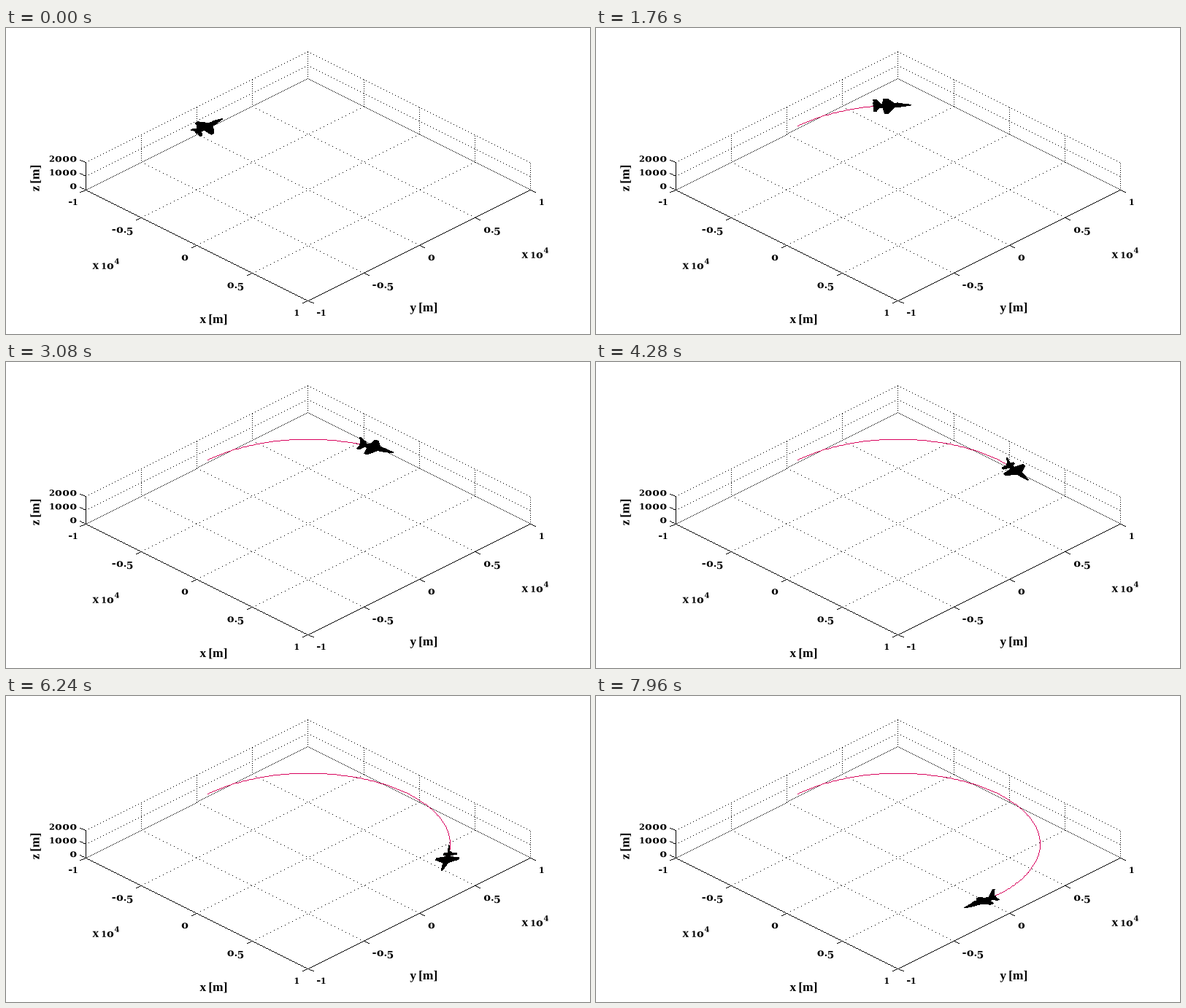
Animation, 800 px wide and 420 px high, one loop 8 s. Source, as a matplotlib script:

```python
import numpy as np
import matplotlib.pyplot as plt
from matplotlib.animation import FuncAnimation
from matplotlib.collections import PolyCollection
from matplotlib.patches import PathPatch
from matplotlib.path import Path
from matplotlib.textpath import TextPath
from matplotlib.transforms import Affine2D

W, H, DPI = 800, 420, 100
FRAMES, INTERVAL = 200, 40

SCALE = 215.3                       # pixels per 10 km
SIN_EL, COS_EL = 0.5, np.sqrt(0.75)
CENTER = np.array([413.4, 221.6])

RADIUS, ALTITUDE = 0.9035, 0.1
START, RATE = np.radians(-135), np.radians(0.95)
BANK = np.radians(9)

fig = plt.figure(figsize=(W / DPI, H / DPI), dpi=DPI, facecolor="white")
ax = fig.add_axes([0, 0, 1, 1])
ax.set_xlim(-0.5, W - 0.5)
ax.set_ylim(H - 0.5, -0.5)
ax.axis("off")


# ---- crisp one-pixel lines ----
def raster(a, b, step=1, phase=0):
    """Pixels of the line a-b, one every `step` along its longer axis."""
    a, b = np.round(a), np.round(b)
    n = max(np.abs(b - a).max(), 1)
    s = np.arange(phase, n + 0.5, step) / n
    return np.round(a + s[:, None] * (b - a))


SQUARE = np.array([(-.5, -.5), (.5, -.5), (.5, .5), (-.5, .5), (-.5, -.5)])
CODES = [Path.MOVETO] + [Path.LINETO] * 3 + [Path.CLOSEPOLY]


def pixel_path(pts):
    verts = (np.asarray(pts)[:, None] + SQUARE).reshape(-1, 2)
    return Path(verts, np.tile(CODES, len(pts)))


# ---- axes box ----
def project(x, y, z=0.0):
    """Scene coordinates (units of 10 km) to pixels."""
    r = SCALE / np.sqrt(2)
    return CENTER + np.array([r * (x + y),
                              r * SIN_EL * (x - y) - SCALE * COS_EL * z])


TICKS = (-1, -0.5, 0, 0.5, 1)
LEVELS = (0, 0.1, 0.2)
lines = []

for t in TICKS[1:-1]:
    lines.append(raster(project(t, -1), project(t, 1), 5))
    lines.append(raster(project(-1, t), project(1, t), 5))
for z in LEVELS:
    lines.append(raster(project(-1, -1, z), project(-1, 1, z), 4))
    lines.append(raster(project(-1, 1, z), project(1, 1, z), 4))
lines.append(raster(project(-1, -1), project(-1, 1), 4, 2))
lines.append(raster(project(-1, 1), project(1, 1), 4, 2))
for t in TICKS:
    if t > -1:
        lines.append(raster(project(-1, t), project(-1, t, 0.2), 3))
    lines.append(raster(project(t, 1), project(t, 1, 0.2), 3))

lines.append(raster(project(-1, -1), project(1, -1)))
lines.append(raster(project(1, -1), project(1, 1)))
lines.append(raster(project(-1, -1), project(-1, -1, 0.2)))
for t in TICKS:
    lines.append(raster(project(t, -1), project(t, -1) + (-7.5, 3.6)))
    lines.append(raster(project(1, t), project(1, t) + (7.5, 3.6)))
for z in LEVELS:
    lines.append(raster(project(-1, -1, z),
                        project(-1, -1, z) + (-7.5, -3.6)))

ax.add_patch(PathPatch(pixel_path(np.concatenate(lines)), fc="black", lw=0,
                       snap=False))


# ---- labels with old-style figures: glyph, size factor, drop in pixels ----
FIGURES = {"0": ("o", 1, 0), "1": ("1", 0.78, 0), "2": ("2", 0.78, 0),
           "5": ("5", 0.95, 3), "4": ("4", 0.7, -7),
           "-": ("-", 1, 0), ".": (".", 0.9, 0)}


def glyph(ch):
    if ch in FIGURES:
        ch, k, drop = FIGURES[ch]
        family, size, gap = "DejaVu Serif", 14.5 * k, 1.7
    else:
        family, size, drop, gap = "Liberation Serif", 17.5, 0, 1
    prop = {"family": family, "weight": "bold"}
    return TextPath((0, 0), ch, size=size, prop=prop), drop, gap


def label(text, x, y, right=False, angle=0):
    parts, pen, gap = [], 0, 0
    for ch in text:
        if ch == " ":
            pen += 3.5
            continue
        path, drop, gap = glyph(ch)
        box = path.get_extents()
        parts.append(path.transformed(
            Affine2D().translate(pen - box.x0, -drop).scale(1, -1)))
        pen += box.width + gap
    shift = gap - pen if right else 0
    place = Affine2D().translate(shift, 0).rotate_deg(angle).translate(x, y)
    path = Path.make_compound_path(*parts).transformed(place)
    ax.add_patch(PathPatch(path, fc="black", lw=0))


NAMES = ("-1", "-0.5", "0", "0.5", "1")
for i, name in enumerate(NAMES):
    label(name, 97 + 75.9 * i, 242.5 + 38 * i, right=True)
    label(name, 425.5 + 76.3 * i, 394.5 - 38 * i)
for i, name in enumerate(("0", "1000", "2000")):
    label(name, 96, 220.5 - 18.7 * i, right=True)
label("x 104", 118, 330.3)
label("x 104", 706, 315.3)
label("x [m]", 265, 404.5)
label("y [m]", 553, 388.5)
label("z [m]", 45, 223.5, angle=-90)


# ---- aircraft: (forward, right, up) in pixels ----
def build_jet():
    parts = []
    f = np.array([28.5, 25, 18, 11, 3, -8, -18, -23])
    w = np.array([0.2, 0.8, 1.8, 2.5, 2.8, 2.8, 2.3, 1.5])
    for a in np.radians([0, 45, 90, 135]):
        parts.append([(p, s * q * np.cos(a), s * q * np.sin(a))
                      for s in (1, -1)
                      for p, q in list(zip(f, w))[::s]])
    for s in (1, -1):
        parts.append([(13, 2 * s, 0), (6, 4 * s, 0), (-3.5, 16 * s, -0.8),
                      (-8.5, 16 * s, -0.8), (-10.5, 2 * s, 0)])
        parts.append([(-14.5, 1.5 * s, 0), (-19.5, 9.3 * s, -1.8),
                      (-23.4, 9.3 * s, -1.8), (-22, 1.5 * s, 0)])
    parts.append([(-12, 0, 2), (-19.8, 0, 11.2), (-23.4, 0, 11.2),
                  (-21.5, 0, 1.5)])
    parts.append([(19, 0, 1.3), (15, 0, 3.4), (10, 0, 4), (2, 0, 2.8)])
    return [np.array(p, float) for p in parts]


JET = build_jet()


def position(n):
    a = START + RATE * n
    r = SCALE * RADIUS
    return CENTER + np.array([r * np.cos(a), r * SIN_EL * np.sin(a)
                              - SCALE * COS_EL * ALTITUDE])


def pose(n):
    a = START + RATE * n
    c, s = np.cos(BANK), np.sin(BANK)
    ahead = np.array([-np.sin(a), np.cos(a), 0])
    inward = np.array([-np.cos(a), -np.sin(a), 0])
    up = np.array([0, 0, 1])
    axes = np.array([ahead, c * inward - s * up, c * up + s * inward])
    view = np.array([[1, 0], [0, SIN_EL], [0, -COS_EL]])
    return [p @ axes @ view + position(n) for p in JET]


def trail_path(n):
    return pixel_path(np.concatenate(
        [raster(position(i), position(i + 1)) for i in range(max(n, 1))]))


trail = PathPatch(trail_path(0), fc="#d8005c", lw=0, snap=False, zorder=4)
ax.add_patch(trail)
jet = PolyCollection([], facecolors="black", linewidths=0,
                     antialiaseds=False, zorder=5)
ax.add_collection(jet, autolim=False)


def update(n):
    trail.set_path(trail_path(n))
    jet.set_verts(pose(n))
    return trail, jet


anim = FuncAnimation(fig, update, frames=FRAMES, interval=INTERVAL,
                     init_func=lambda: update(0), repeat=True, repeat_delay=0)
plt.show()
```
